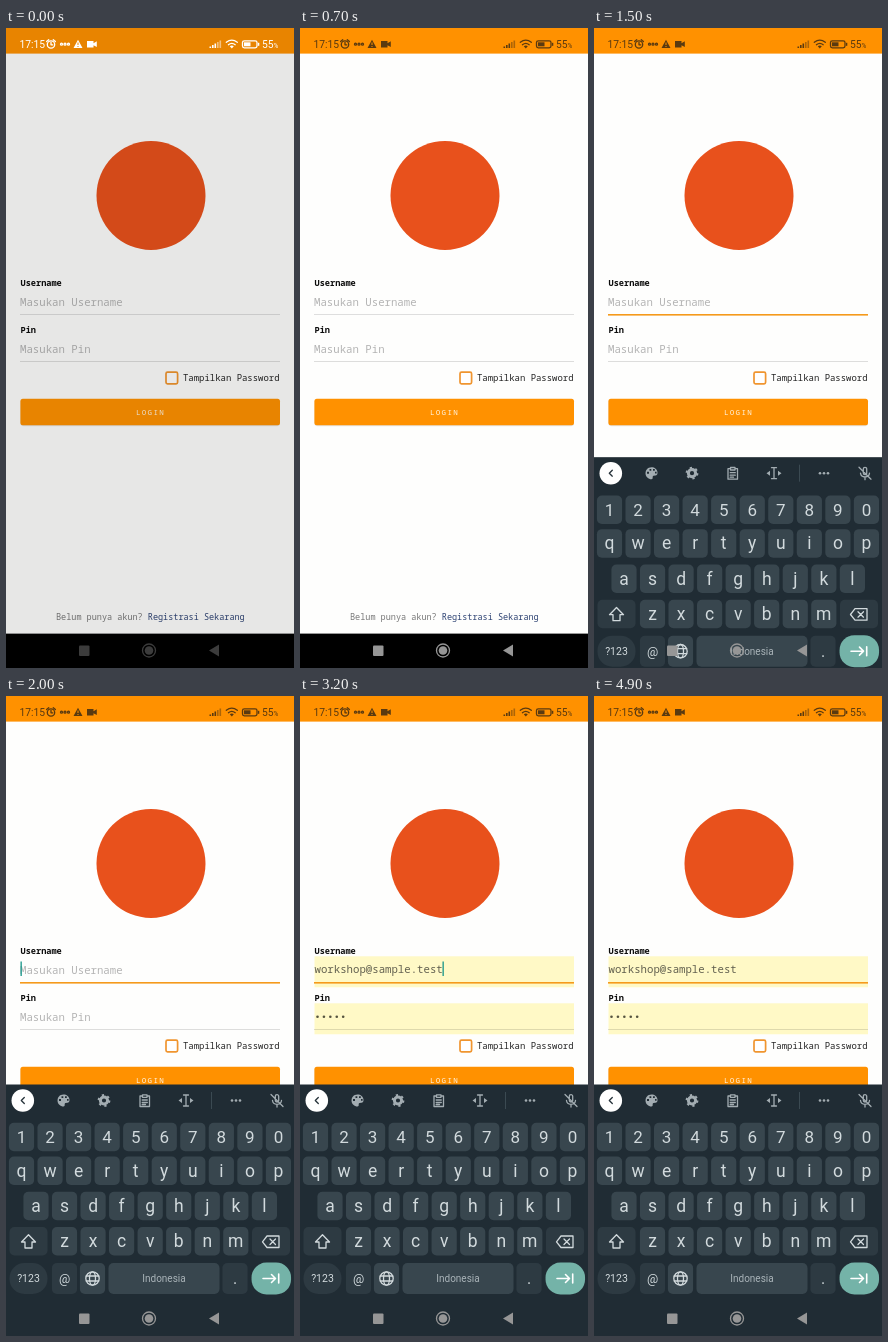
Recreate the animation shown at these times as an HTML page. Size 288 px wide and 640 px high, loop 5 s.

```html
<!DOCTYPE html>
<html lang="id">
<head>
<meta charset="utf-8">
<title>Login</title>
<style>
html, body { margin: 0; width: 100%; height: 100%; overflow: hidden; background: #fff; }
svg { display: block; }
#stage { width: 100vw; height: 100vh; }
text { white-space: pre; }
.mono { font-family: "Noto Sans Mono", "DejaVu Sans Mono", monospace; }
.sans { font-family: Roboto, "Open Sans", sans-serif; }
.mid { text-anchor: middle; }
.line { fill: none; stroke: currentColor; stroke-width: 1.3; stroke-linecap: round; stroke-linejoin: round; }
.fill { fill: currentColor; }
</style>
</head>
<body>
<svg id="stage" viewBox="0 0 288 640" preserveAspectRatio="none">
  <defs>
    <clipPath id="chipClip"><rect x="34" y="388" width="217" height="34"/></clipPath>
    <radialGradient id="ripple">
      <stop offset="0" stop-color="#000" stop-opacity=".5"/>
      <stop offset="1" stop-color="#000"/>
    </radialGradient>
  </defs>

  <rect width="288" height="640" fill="#fefefd"/>
  <rect width="288" height="25.600" fill="#ff9100"/>
  <circle cx="145" cy="167.500" r="54.500" fill="#e8511c"/>

  <g class="mono">
    <g id="filled">
      <rect x="14.500" y="260.300" width="259.500" height="31" fill="#fff9c6"/>
      <rect x="14.500" y="307.300" width="259.500" height="31" fill="#fff9c6"/>
      <text x="14.500" y="277" font-size="10.700" fill="#62604f">workshop@sample.test</text>
      <g id="dots" fill="#55533f"></g>
    </g>
    <g id="hints" font-size="10.700" fill="#b4b4b4">
      <text x="14" y="277.500">Masukan Username</text>
      <text x="14" y="324.500">Masukan Pin</text>
    </g>
    <g font-size="8.600" font-weight="600" fill="#0c0c0c">
      <text x="14.500" y="257.500">Username</text>
      <text x="14.500" y="304.500">Pin</text>
    </g>
    <rect id="caret" x="142.500" y="265.500" width="1.300" height="14.500" fill="#159588"/>
    <rect x="14" y="286" width="260" height="1" fill="#dedede"/>
    <rect id="focus" x="14" y="286" width="260" height="1.600" fill="#f59a1b"/>
    <rect x="14" y="333" width="260" height="1" fill="#000" opacity=".13"/>
    <rect x="160" y="344.200" width="11.600" height="11.600" rx="1.500" fill="#fff" stroke="#f0952f" stroke-width="1.700"/>
    <text x="177" y="353.300" font-size="8.950" font-weight="500" fill="#222">Tampilkan Password</text>
    <rect x="14.500" y="372" width="259.500" height="26.200" rx="3" fill="#000" opacity=".1"/>
    <rect x="14.400" y="370.800" width="259.600" height="26.500" rx="2.500" fill="#ff9100"/>
    <rect id="press" x="14.400" y="370.800" width="259.600" height="26.500" rx="2.500" fill="url(#ripple)"/>
    <text x="130" y="386.800" font-size="7.600" letter-spacing="1.250" font-weight="500" fill="#fff3df">LOGIN</text>
    <text x="50" y="592" font-size="8.500" fill="#777">Belum punya akun? <tspan font-weight="500" fill="#2d4272">Registrasi Sekarang</tspan></text>
  </g>

  <rect id="dim" width="288" height="605.600" fill="#000"/>
  <rect y="605.600" width="288" height="35" fill="#000"/>

  <g id="status">
    <text class="sans fill" x="13.500" y="19.800" font-size="10.300">17:15</text>
    <g class="line" stroke-width="1">
      <circle cx="45" cy="16.500" r="3.700"/>
      <path d="M45 14.300V16.800H46.800M40.600 13.500L42.700 11.700M49.400 13.500L47.300 11.700"/>
      <circle cx="55.500" cy="16.200" r="1"/><circle cx="59" cy="16.200" r="1"/><circle cx="62.500" cy="16.200" r="1"/>
    </g>
    <path class="fill" fill-rule="evenodd" d="M72 11.700L76.500 20H67.500ZM71.500 14.500V17H72.500V14.500ZM71.500 18V19H72.500V18Z"/>
    <path class="fill" d="M81 13H87.500V15.200L90.800 13.300V19L87.500 17.200V19.500H81Z"/>
    <g id="signal" class="fill"></g>
    <path class="line" d="M220.300 14.300Q225.800 9.800 231.300 14.300M222.400 16.700Q225.800 13.900 229.200 16.700"/>
    <path class="fill" d="M223.800 18.300Q225.800 16.800 227.800 18.300L225.800 20.400Z"/>
    <rect class="line" x="236.500" y="12.800" width="14.500" height="7" rx="1.800"/>
    <rect class="fill" x="238" y="14.300" width="6.500" height="4"/>
    <rect class="fill" x="252" y="14.800" width="1.300" height="3"/>
    <text class="sans fill" x="256" y="19.800" font-size="10.300">55<tspan font-size="6.500">%</tspan></text>
  </g>

  <g id="board">
    <rect y="388.500" width="288" height="260" fill="#202c34"/>
    <circle cx="16.800" cy="404.500" r="11.300" fill="#fff"/>
    <g id="tools" color="#a3adb2">
      <path d="M18.300 401.500L15.300 404.500L18.300 407.500" class="line" style="color:#26323a"/>
      <path class="fill" fill-rule="evenodd" d="M57.500 398.500C53.500 398.500 51.500 401.500 51.500 404.500C51.500 408 54.500 410.500 57.500 410.500C59.500 410.500 58.200 408.300 59 407.300C60 406.300 63.500 408 63.500 404C63.500 400.500 60.500 398.500 57.500 398.500ZM53 403H55V405H53ZM55.500 400.300H57.300V402.100H55.500ZM59 400.300H60.800V402.100H59ZM61 403H62.600V404.800H61Z"/>
      <circle class="line" cx="98" cy="404.500" r="3.600" style="stroke-width:3"/>
      <circle class="line" cx="98" cy="404.500" r="5.400" style="stroke-width:2;stroke-dasharray:2.200 3.455;stroke-linecap:butt"/>
      <path class="line" d="M136 400H134V410.500H143.500V400H141.500M136.500 398.800H141V401.300H136.500ZM136.200 404H141.300M136.200 406.500H141.300M136.200 408.500H139.500"/>
      <path class="line" d="M177.500 399H182.500M177.500 410H182.500M180 399V410"/>
      <path class="fill" d="M172.500 404.500L176 402V407ZM187.500 404.500L184 402V407Z"/>
      <path d="M205.500 396V413" stroke="#3b4a52"/>
      <g class="fill"><circle cx="226" cy="404.500" r="1.300"/><circle cx="230" cy="404.500" r="1.300"/><circle cx="234" cy="404.500" r="1.300"/></g>
      <path class="line" d="M269.300 400.300A1.700 1.700 0 0 1 272.700 400.300V404.300A1.700 1.700 0 0 1 269.300 404.300ZM266.500 404.500Q267 408.300 271 408.300Q275 408.300 275.500 404.500M271 408.500V411M265 398.500L277 410.500"/>
    </g>
    <g id="chips" class="sans">
      <path d="M15.300 401.500L18.300 404.500L15.300 407.500" class="line" style="color:#26323a"/>
      <g clip-path="url(#chipClip)">
        <rect x="41.500" y="392.500" width="159" height="24.500" rx="12.250" fill="#34424a" stroke="#687780"/>
        <rect x="207.500" y="392.500" width="120" height="24.500" rx="12.250" fill="#34424a" stroke="#687780"/>
        <circle cx="56.500" cy="404.700" r="6" fill="#67a99d"/>
        <circle cx="223" cy="404.700" r="6" fill="#67a99d"/>
        <g font-size="10.500" font-weight="500" fill="#eef2f4">
          <text x="68" y="408.300">workshop@sample.test</text>
          <text x="234" y="408.300">sundari</text>
        </g>
        <g fill="#dce3e6"><circle cx="182.500" cy="405" r="1"/><circle cx="186.200" cy="405" r="1"/><circle cx="189.900" cy="405" r="1"/></g>
      </g>
      <circle cx="265" cy="404.500" r="3" fill="none" stroke="#fff" stroke-width="2.600"/>
      <path d="M268 404.500H277M274.500 404.500V408" stroke="#fff" stroke-width="2.600" fill="none"/>
    </g>
    <g id="keys" class="sans mid" fill="#d2dadd"></g>
    <g color="#d2dadd">
      <path class="line" d="M22.500 538.800L29.500 546H26V552H19V546H15.500Z"/>
      <path class="line" d="M261 540H273V551.500H261L256.500 545.800ZM264 543L269.500 548.500M269.500 543L264 548.500"/>
      <g class="line"><circle cx="86.500" cy="582.500" r="6.700"/><ellipse cx="86.500" cy="582.500" rx="3" ry="6.700"/><path d="M80.300 580H92.700M80.300 585H92.700"/></g>
      <path class="line" style="color:#fff;stroke-width:1.600" d="M257 582.500H269M265.500 578.500L269.500 582.500L265.500 586.500M272.700 578V587"/>
    </g>
  </g>

  <g id="nav">
    <rect class="fill" x="73" y="617.500" width="10.500" height="10.500" rx="1"/>
    <circle class="line" cx="143" cy="622.500" r="6.500"/>
    <circle class="fill" cx="143" cy="622.500" r="4.300"/>
    <path class="fill" d="M203 622.500L213 616.500V628.500Z"/>
  </g>
</svg>

<script>
const LOOP = 5000;
const $ = id => document.getElementById(id);

function add(parent, tag, attrs, text) {
  const el = document.createElementNS("http://www.w3.org/2000/svg", tag);
  for (const k in attrs) el.setAttribute(k, attrs[k]);
  if (text) el.textContent = text;
  parent.appendChild(el);
}

const DARK_KEY = "#2d3a42";

function key(x, y, label, opt = {}) {
  const { w = 25.2, h = 28.5, r = 5, bg = "#38464e", size = 18, ink = "#d2dadd" } = opt;
  add($("keys"), "rect", { x: x - w / 2, y: y - h / 2, width: w, height: h, rx: r, fill: bg });
  if (label) add($("keys"), "text", { x, y: y + size * 0.35, "font-size": size, fill: ink }, label);
}

function row(letters, x, y, size) {
  [...letters].forEach((c, i) => key(x + i * 28.55, y, c, { size }));
}

row("1234567890", 15.5, 441, 17);
row("qwertyuiop", 15.5, 474.7, 17.5);
row("asdfghjkl", 30, 510, 17.5);
row("zxcvbnm", 58.5, 545.3, 17.5);
key(22.5, 545.3, "", { w: 38, bg: DARK_KEY });
key(265, 545.3, "", { w: 38, bg: DARK_KEY });
key(22.5, 582.5, "?123", { w: 38, h: 31, r: 15, bg: DARK_KEY, size: 10.5 });
key(58.5, 582.5, "@", { h: 31, bg: DARK_KEY, size: 12.5 });
key(86.5, 582.5, "", { h: 31 });
key(158, 582.5, "Indonesia", { w: 111, h: 31, size: 10, ink: "#a9b3b8" });
key(229, 582.5, ".", { h: 31, bg: DARK_KEY, size: 16 });
key(265.3, 582.5, "", { w: 39.5, h: 32, r: 15, bg: "#74b3a8" });

for (let i = 0; i < 5; i++) {
  add($("dots"), "circle", { cx: 17.5 + i * 6.42, cy: 320.7, r: 1.3 });
  add($("signal"), "rect", { x: 203.5 + i * 2.5, y: 18.5 - i * 1.5, width: 1.6, height: 1.5 + i * 1.5, opacity: i < 3 ? 1 : 0.5 });
}

// Each track: [time, value] steps, linear between neighbours.
const tracks = {
  dim: [[0, 0.09], [100, 0.09], [500, 0]],
  nav: [[0, 60], [100, 60], [500, 150]],
  slide: [[1300, 252], [1400, 125], [1500, 41], [1600, 9], [1700, 0]],
  press: [[4000, 0], [4150, 0.17], [4400, 0.17], [4650, 0]]
};

function at(track, t) {
  if (t <= track[0][0]) return track[0][1];
  for (let i = 1; i < track.length; i++) {
    const [t0, a] = track[i - 1], [t1, b] = track[i];
    if (t < t1) return a + (b - a) * (t - t0) / (t1 - t0);
  }
  return track[track.length - 1][1];
}

const within = (t, spans) => spans.some(([a, b]) => t >= a && t < b);
const show = (id, on) => $(id).setAttribute("display", on ? "inline" : "none");
const blinks = [[1000, 1500], [2000, 2500], [3100, 3700], [4200, 4700]];

function draw(t) {
  const filled = t >= 3100;
  const chips = t >= 2100 && !filled;
  const grey = Math.round(at(tracks.nav, t));
  show("filled", filled);
  show("hints", !filled);
  show("focus", t >= 1000);
  show("caret", within(t, blinks));
  $("caret").setAttribute("x", filled ? 142.5 : 14.5);
  show("chips", chips);
  show("tools", !chips);
  show("board", t >= 1300);
  $("board").setAttribute("transform", `translate(0 ${at(tracks.slide, t)})`);
  $("dim").setAttribute("opacity", at(tracks.dim, t));
  $("press").setAttribute("opacity", at(tracks.press, t));
  $("nav").setAttribute("color", `rgb(${grey},${grey},${grey})`);
  $("status").setAttribute("color", t < 300 ? "#fff" : "#5a3a10");
}

const start = performance.now();
function tick() {
  draw((performance.now() - start) % LOOP);
  requestAnimationFrame(tick);
}
draw(0);
requestAnimationFrame(tick);
</script>
</body>
</html>
```
